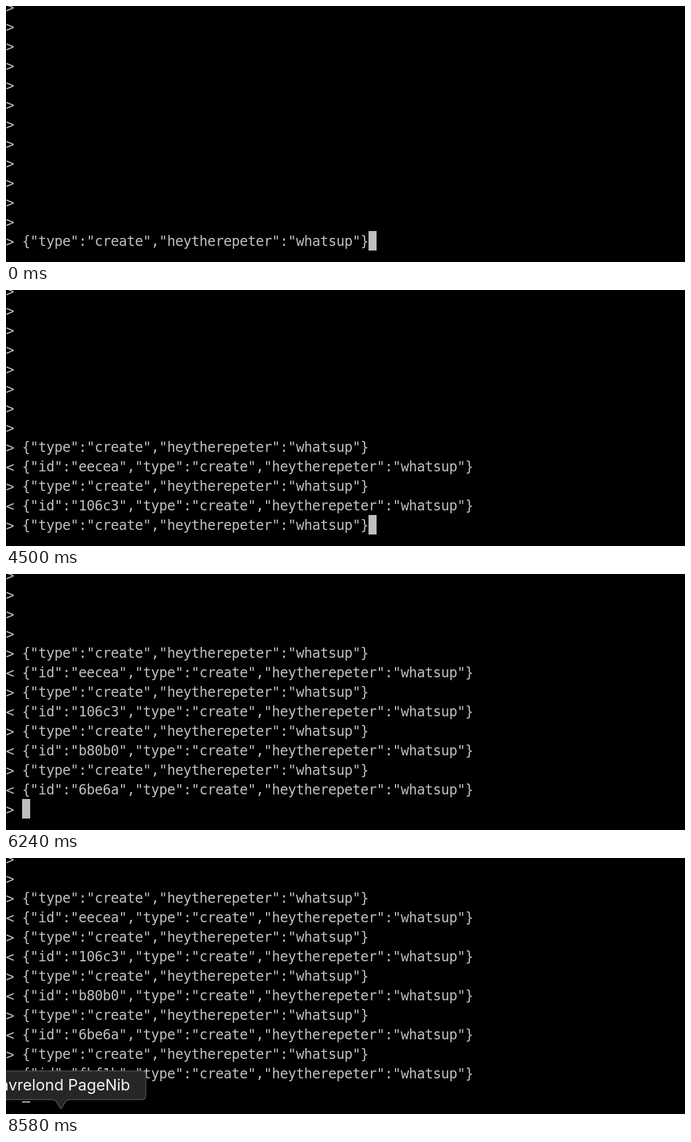
An HTML page that plays this animation: 1180x446 px, repeating every 8.64 s.

```html
<!DOCTYPE html>
<html lang="en">
<head>
<meta charset="utf-8">
<title>Terminal session</title>
<style>
  html, body { margin: 0; width: 100%; height: 100%; overflow: hidden; background: #000; }
  pre, #cursor, svg { position: absolute; margin: 0; }
  pre {
    top: -15px; color: #bfbfbf;
    font: 24px/34px "DejaVu Sans Mono", monospace;
    letter-spacing: calc(14px - 1ch);
  }
  #marks { left: 0; top: -14px; }
  #screen { left: 28px; }
  #cursor { top: 392px; width: 14px; height: 34px; box-sizing: border-box; background: #bfbfbf; }
  #cursor.idle { background: none; border-bottom: 2px solid #bfbfbf; }
  svg { left: 0; top: 0; }
</style>
</head>
<body>
<pre id="marks"></pre>
<pre id="screen"></pre>
<div id="cursor"></div>
<svg width="1180" height="446">
  <g id="tip">
    <path d="M-60 371H236Q243 371 243 378V414Q243 421 236 421H110Q106 421 103 425L97 435.500Q95.500 438 94 435.500L88 425Q85 421 81 421H-60Z"
          fill="#262626" stroke="#505050" stroke-width="1.500"/>
    <text x="95" y="405" text-anchor="middle" fill="#f4f4f4" font-size="27" font-family="Inter, sans-serif">Tavrelond PageNib</text>
  </g>
</svg>
<script>
const LOOP = 8640, ROWS = 13, CELL = 14;
const TIP_START = 7980, TIP_END = 8580, IDLE = 8400;
const body = '"type":"create","heytherepeter":"whatsup"}';
const command = '{' + body;

// Times at which each command is recalled, sent and answered
const rounds = [
  { recall: 0, send: 600, reply: 1200, id: 'eecea' },
  { recall: 2160, send: 2640, reply: 3600, id: '106c3' },
  { recall: 4140, send: 4620, reply: 4800, id: 'b80b0' },
  { recall: 5580, send: 5820, reply: 5940, id: '6be6a' },
  { recall: 6720, send: 7020, reply: 7140, id: 'fbf1b' }
];

const [marks, screen, cursor, tip] =
  ['marks', 'screen', 'cursor', 'tip'].map(id => document.getElementById(id));

function show(pre, parts) {
  const text = parts.join('\n');
  if (pre.textContent !== text) pre.textContent = text;
}

function draw(now) {
  const t = now % LOOP;
  const lines = Array(ROWS).fill(['>', '']);
  let input = '';
  for (const r of rounds) {
    if (t >= r.send) lines.push(['>', command]);
    else if (t >= r.recall) input = command;
    if (t >= r.reply) lines.push(['<', `{"id":"${r.id}",${body}`]);
  }
  lines.push(['>', input]);
  const visible = lines.slice(-ROWS);
  show(marks, visible.map(line => line[0]));
  show(screen, visible.map(line => line[1]));

  cursor.style.left = (2 + input.length) * CELL + 'px';
  cursor.className = t >= IDLE ? 'idle' : '';

  // The label rises from below in 60 ms ticks
  const tick = Math.floor(t / 60) * 60;
  const p = Math.min(1, Math.max(0, (tick - TIP_START + 60) / (TIP_END - TIP_START)));
  tip.setAttribute('transform', `translate(0 ${80 * (1 - p) ** 2})`);
  requestAnimationFrame(draw);
}
draw(performance.now());
</script>
</body>
</html>
```
